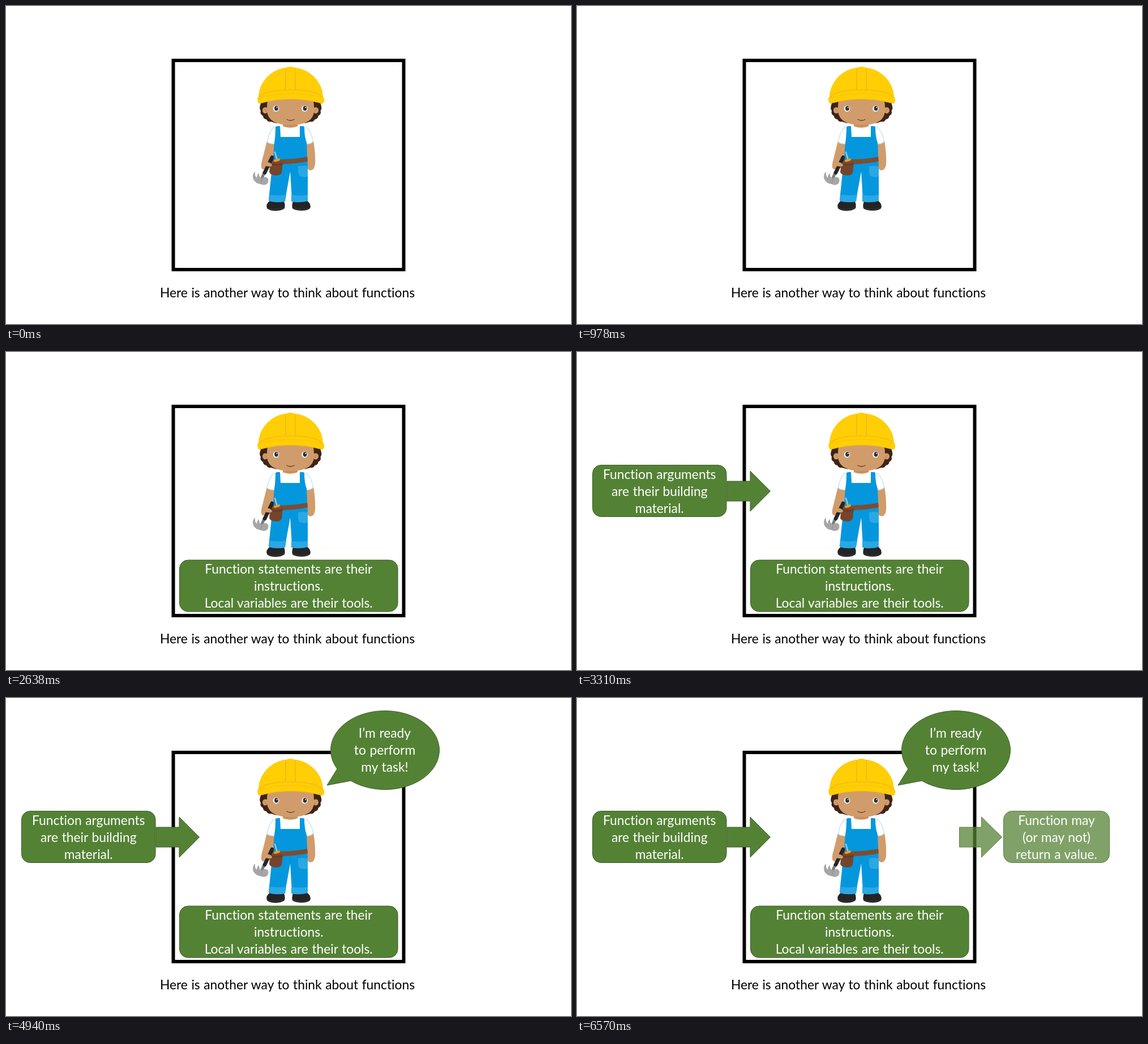
Recreate the animation shown at these times as an HTML page. Size 998x561 px, loop 8200 ms.

```html
<!DOCTYPE html>
<html lang="en">
<head>
<meta charset="utf-8">
<title>Functions as builders</title>
<style>
  html, body { margin: 0; width: 100%; height: 100%; overflow: hidden; background: #fff; }
  svg { display: block; width: 100%; height: 100%; }
  text { font: 22.8px Lato, Carlito, sans-serif; font-variant-ligatures: none; word-spacing: .7px; text-anchor: middle; fill: #fff; }
  .caption { fill: #000; }
  .step { visibility: hidden; }
  .box { fill: #548235; stroke: #3b5f25; stroke-width: 1; stroke-linejoin: round; }
  .faint .box { fill-opacity: .74; stroke: #55803a; }
  .line { fill: none; stroke-linecap: round; stroke-linejoin: round; }
</style>
</head>
<body>
<svg viewBox="0 0 998 561">
  <rect x="295.5" y="96" width="407" height="369" fill="none" stroke="#000" stroke-width="6"/>
  <text class="caption" x="497" y="514">Here is another way to think about functions</text>

  <g id="builder">
    <!-- arms -->
    <g fill="#d19c6b">
      <path d="M461 238 L475 241 Q473 260 469 273 Q473 281 466 285 Q457 291 452 287 Q449 282 453 270 Z"/>
      <path d="M530 241 L543 237 Q547 262 546 279 Q545 289 538 290 Q531 289 531 281 Z"/>
    </g>
    <!-- neck and shirt -->
    <path d="M475 212 Q464 221 461 240 Q467 244 475 243 L530 243 Q538 244 543 239 Q540 220 528 212 Z" fill="#fff"/>
    <path class="line" d="M474 213 Q464 221 461.500 240 Q467 244 474 243 M529 213 Q540 221 542.500 239 Q538 244 531 243" stroke="#b9e2e6" stroke-width="1.200"/>
    <path d="M489 205 H515 V212 Q502 217 489 212 Z" fill="#c58f60"/>
    <path class="line" d="M489 212 Q502 217 515 212" stroke="#e8b394" stroke-width="1"/>

    <!-- shoes -->
    <g fill="#242424">
      <path d="M467 343 H490 Q494 350 492 357 Q487 361 476 361.500 Q465 361 461 357 Q458 349 467 343 Z"/>
      <path d="M508 343 H531 Q540 349 537 357 Q533 361 522 361 Q511 361 506 357 Q504 350 508 343 Z"/>
    </g>
    <path class="line" d="M462 357 Q477 361 491 356 M507 356 Q521 361 536 357" stroke="#3a3a3a" stroke-width="1"/>

    <!-- overalls -->
    <path d="M476 213 Q480 211 484 212 L485 231 H519 V212 Q524 211 527 213 Q527 231 531 241 L533 284 L533 342 Q519 346 505 342 L502 292 L493 342 Q479 347 464 342 L470 284 L474 241 Q476 230 476 213 Z" fill="#0597dd"/>
    <g fill="#2aa8e4">
      <path d="M466 333 Q481 335 495 333 L493 345 Q478 348 464 344 Z"/>
      <path d="M504 333 Q519 336 533 333 V344 Q519 348 504 345 Z"/>
      <path d="M516 283 Q525 281 533 283 V301 Q526 303 518 300 Q515 294 516 283 Z"/>
    </g>
    <path class="line" d="M502 292 V281" stroke="#078bca" stroke-width="1"/>

    <!-- belt, pouch and tools -->
    <path d="M470 270 Q502 272 532 266 L533 274 Q502 281 470 278 Z" fill="#7c4e32"/>
    <path class="line" d="M475 258 L479 272" stroke="#b8c0c4" stroke-width="2.500"/>
    <path class="line" d="M475 273 L482 271" stroke="#f49b22" stroke-width="4"/>
    <path d="M467 275 Q478 278 489 275 L487 294 Q485 299 477 299 Q466 298 465 293 Z" fill="#74452b"/>
    <path class="line" d="M467 279 Q478 282 488 279" stroke="#5f3825" stroke-width="1.500"/>

    <!-- hammer and hand -->
    <path class="line" d="M456 294 L452 304" stroke="#777c7e" stroke-width="5"/>
    <path class="line" d="M470 267 L457 294" stroke="#242629" stroke-width="6.500"/>
    <path d="M440 292 Q434 297 437 306 Q441 313 449 314 Q457 318 462 313 Q466 305 460 302 Q455 301 452 304 Q446 302 447 295 Q443 297 443 303 Q439 300 440 292 Z" fill="#a6a6a6"/>
    <path class="line" d="M453 304 L450 313" stroke="#8d8d8d" stroke-width="1"/>
    <path d="M458 276 Q466 274 470 280 Q470 284 463 283 L456 282 Z" fill="#d19c6b"/>

    <!-- hair, ears and face -->
    <path id="curls" d="M464 166 H450 Q451 171 449 175 Q447 181 450 185 Q448 191 454 194 Q454 199 460 200 Q462 205 468 204 L478 207 Z" fill="#3e2417"/>
    <use href="#curls" transform="matrix(-1 0 0 1 1005.500 0)"/>
    <g fill="#d19c6b">
      <ellipse cx="458" cy="184" rx="5" ry="5.500"/>
      <ellipse cx="547" cy="184" rx="5" ry="5.500"/>
      <path d="M463 163 H542 Q545 176 544 186 Q542 210 502.500 210 Q464 210 461 186 Q460 175 463 163 Z"/>
    </g>
    <path class="line" d="M456 182 Q460 183 459 187 M549 182 Q545 183 546 187" stroke="#b58253" stroke-width="1"/>
    <path class="line" d="M496 200 Q502.500 204 509 200" stroke="#60391f" stroke-width="1.300"/>
    <g id="eye">
      <ellipse cx="477" cy="181" rx="5.300" ry="5.400" fill="#fff"/>
      <ellipse cx="477.500" cy="180.500" rx="3.400" ry="4.300" fill="#26343a"/>
      <circle cx="478.700" cy="179" r="1" fill="#fff"/>
    </g>
    <use href="#eye" x="50.500"/>

    <!-- helmet -->
    <path d="M446 160 C447 134 469 111 494 109 Q502 105 511 109 C537 111 559 134 560 160 Q563 162 562 168 Q561 173 557 172 Q503 157 449 172 Q445 173 444.500 167 Q443 162 446 160 Z" fill="#ffce05"/>
    <path class="line" d="M448 160 Q456 150 494 148 V110 M511 110 V148 Q549 150 558 160 M497 149 Q503 146 509 149" stroke="#f4b915" stroke-width="1.700"/>
    <path class="line" d="M448 161 Q503 147 559 161" stroke="#f9c20c" stroke-width="1"/>
    <path class="line" d="M449 171 Q503 157 557 171" stroke="#eeb619" stroke-width="1"/>
  </g>

  <g id="steps"></g>
</svg>
<script>
  const LOOP = 8200;
  const lines = (x, y, rows) =>
    rows.map((row, i) => `<text x="${x}" y="${y + 30 * i}">${row}</text>`).join("");
  const panel = (x, y, w, rows) =>
    `<rect class="box" x="${x}" y="${y}" width="${w}" height="91" rx="15"/>` +
    lines(x + w / 2, y + 24, rows);
  const arrow = (x, neck, tip) =>
    `<path class="box" d="M${x} 228H${neck}V210L${tip} 245.5L${neck} 281V263H${x}Z"/>`;
  const bubble =
    `<path class="box" d="M585 125A96 69.5 0 1 1 609 146L567 154Z"/>`;

  const steps = [
    { at: 1630, art: panel(306.5, 367, 385.5,
      ["Function statements are their", "instructions.", "Local variables are their tools."]) },
    { at: 3310, art: arrow(265, 306, 341.5) + panel(27.5, 199.5, 236.5,
      ["Function arguments", "are their building", "material."]) },
    { at: 4940, art: bubble + lines(669, 70, ["I’m ready", "to perform", "my task!"]) },
    { at: 6570, look: "faint", art: arrow(675.5, 714.5, 750.5) + panel(753.5, 199.5, 187,
      ["Function may", "(or may not)", "return a value."]) },
  ];

  const root = document.getElementById("steps");
  root.innerHTML = steps.map(s => `<g class="step ${s.look || ""}">${s.art}</g>`).join("");

  const start = performance.now();
  function draw() {
    const t = (performance.now() - start) % LOOP;
    steps.forEach((s, i) => {
      root.children[i].style.visibility = t >= s.at ? "visible" : "hidden";
    });
    requestAnimationFrame(draw);
  }
  draw();
</script>
</body>
</html>
```
